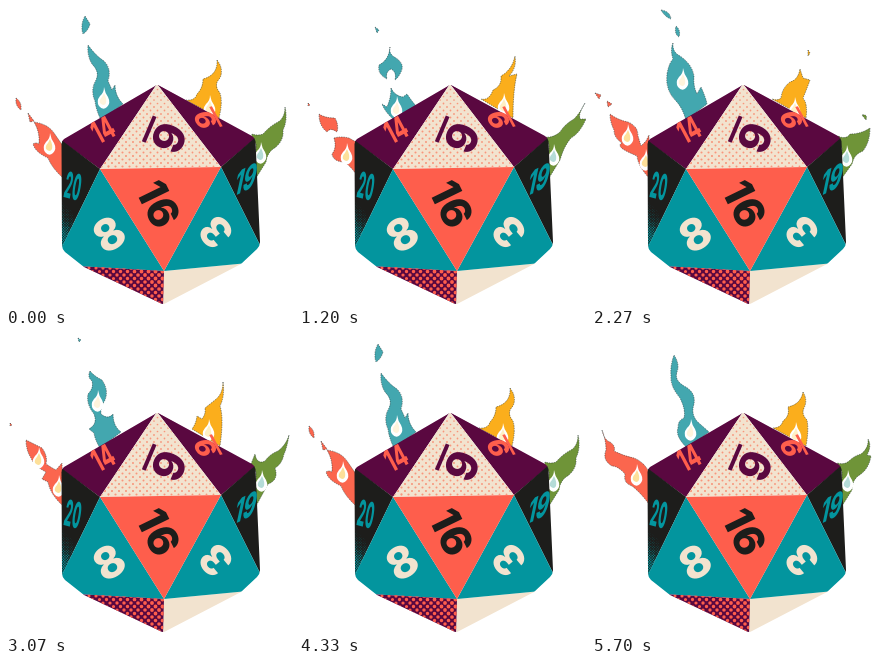
Recreate the animation shown at these times as an HTML page. Size 287 by 300 pixels, loop 5730 ms.

```html
<!DOCTYPE html>
<html lang="en">
<head>
<meta charset="utf-8">
<title>Burning d20</title>
<style>
  html, body { margin: 0; width: 100%; height: 100%; overflow: hidden; background: #fff; }
  svg { display: block; width: 287px; height: 300px; }
  .pose { visibility: hidden; }
  .pose.on { visibility: visible; }
  .pose path { stroke: #1c2b2b; stroke-width: .7; stroke-opacity: .7; stroke-dasharray: 1.4 1; }
  .t { fill: #43a7af; }
  .r { fill: #fb664e; }
  .y { fill: #fbae1c; }
  .g { fill: #6f9438; }
  .tc { color: #fff4dc; }
  .rc { color: #fde09a; }
  .yc { color: #fff0c4; }
  .gc { color: #b5dcd8; }
  .purple { fill: #5a0840; }
  .cream { fill: #f2e3cf; }
  .coral { fill: #fe5e4c; }
  .teal { fill: #03959e; }
  .ink { fill: #1d1d1b; }
  text { font-family: Inter, "Liberation Sans", sans-serif; font-weight: 800; text-anchor: middle; }
</style>
</head>
<body>
<svg viewBox="0 0 287 300">
  <defs>
    <g id="drop">
      <path fill="#fff" style="stroke:none" d="M1-11Q2-5 5-1Q8 5 4 9Q0 13-4 8Q-7 3-3-2Q1-5 1-11Z"/>
      <path fill="currentColor" style="stroke:none" d="M1-5Q4 1 3 5Q1 9-3 5Q-4 2-1-1Z"/>
    </g>
    <clipPath id="die"><path d="M149 80Q151.500 78 154 80L246 130Q249 132 249.500 135L254 236Q254 240 251 243L235 258L160 297Q157 299 154 297L78 261L59 246Q56 243 56 239L55.500 138Q55.500 135 58 133Z"/></clipPath>
    <clipPath id="top"><path d="M151 79L94 163L215 161Z"/></clipPath>
    <clipPath id="side"><path d="M55 134L94 163L56 242Z"/></clipPath>
    <clipPath id="base"><path d="M76 260L158 265L157 299Z"/></clipPath>
  </defs>

  <g id="fire">
    <g class="pose">
      <path class="t" d="M79 10L84 18Q82 25 77 28Q74 19 79 10ZM82 39Q90 50 98 55Q106 63 102 75L106 84L109 79Q109 90 117 98L95 114Q90 104 89 95Q84 84 90 74Q94 66 86 58Q81 50 82 39Z"/>
      <path class="r" d="M10 92Q16 96 15 104Q9 100 10 92ZM22 107L28 115L24 116ZM28 116Q42 118 48 127L57 140V172Q46 162 42 152Q29 146 27 138Q30 136 33 138Q34 126 28 116Z"/>
      <path class="y" d="M211 54Q218 63 214 72Q207 79 214 87Q217 96 213 112L180 94Q189 95 191 88Q197 82 197 73Q212 69 211 54Z"/>
      <path class="g" d="M279 101Q282 114 277 124Q278 134 270 141Q261 146 260 156L250 172V138Q244 134 246 128Q252 130 257 128Q264 120 272 116Q279 112 279 101Z"/>
      <use href="#drop" class="tc" x="97" y="92"/><use href="#drop" class="rc" x="43" y="138"/>
      <use href="#drop" class="yc" x="203" y="100"/><use href="#drop" class="gc" x="254" y="147"/>
    </g>
    <g class="pose">
      <path class="t" d="M69 4Q78 5 79 13Q73 11 69 4ZM84 20Q89 24 87 31Q82 28 84 20ZM81 37Q80 46 88 50Q100 58 102 70Q101 80 105 88L109 81Q114 92 115 98L94 114Q90 101 84 95Q73 84 75 68Q77 57 81 53Q78 44 81 37Z"/>
      <path class="r" d="M3 87L9 89L7 93ZM15 95L20 98L16 101ZM18 108Q26 114 36 116Q46 120 46 130L49 140L54 135L57 129V172Q46 160 45 150L36 146Q24 140 30 137Q22 132 22 124Q18 116 18 108Z"/>
      <path class="y" d="M216 44L218 47L216 50ZM208 63L211 72L218 74Q214 85 211 92Q216 98 214 112L180 93Q186 95 189 92Q190 82 198 76Q206 74 208 63Z"/>
      <path class="g" d="M270 109Q276 108 274 114ZM278 122Q278 136 271 145Q262 148 260 158L250 172V142Q244 136 246 130Q254 134 258 128Q269 128 278 122Z"/>
      <use href="#drop" class="tc" x="90" y="73"/><use href="#drop" class="rc" x="35" y="129"/>
      <use href="#drop" class="rc" x="53" y="154"/><use href="#drop" class="yc" x="202" y="102"/><use href="#drop" class="gc" x="254" y="150"/>
    </g>
    <g class="pose">
      <path class="t" d="M72 4L75 6L73 8ZM84 37Q88 42 96 46Q103 56 99 66Q94 74 95 80Q102 86 107 80Q107 92 115 98L94 114Q89 106 88 99L83 95Q92 90 88 80Q80 70 82 60Q88 54 86 47Q81 43 84 37Z"/>
      <path class="r" d="M4 89L6 91L4 92ZM20 106Q28 110 36 114Q42 122 40 130Q46 134 50 136L56 129L57 172Q44 160 42 148L36 145L40 138Q28 132 25 124Q20 116 20 106Z"/>
      <path class="y" d="M217 48Q219 62 214 72Q218 84 214 112L186 95Q190 90 191 82L196 85Q200 80 199 74Q204 70 209 66Q217 60 217 48Z"/>
      <path class="g" d="M283 101Q281 114 278 120Q276 130 269 134Q273 146 262 150L250 172V138L245 130L249 120Q251 131 259 127Q264 120 272 117Q280 111 283 101Z"/>
      <use href="#drop" class="tc" x="91" y="67"/><use href="#drop" class="rc" x="32" y="124"/>
      <use href="#drop" class="rc" x="52" y="152"/><use href="#drop" class="yc" x="202" y="96"/><use href="#drop" class="gc" x="255" y="147"/>
    </g>
    <g class="pose">
      <path class="t" d="M88 31Q89 41 96 47Q105 56 100 68Q95 77 103 85L107 81Q110 92 116 99L94 114Q85 104 84 95Q84 87 89 79Q80 71 81 61Q85 54 88 48Q86 40 88 31Z"/>
      <path class="r" d="M16 99Q24 108 34 111Q42 118 39 127L50 134L56 130L57 171Q46 160 42 150L34 146L38 138Q34 130 28 124Q17 116 16 99Z"/>
      <path class="y" d="M213 50Q218 63 213 74Q217 88 214 112L183 94Q190 91 192 82Q198 78 199 70Q213 64 213 50Z"/>
      <path class="g" d="M280 102Q281 114 277 122Q275 133 268 138Q269 147 261 152L250 172V138L246 128Q253 131 260 126Q276 117 280 102Z"/>
      <use href="#drop" class="tc" x="91" y="65"/><use href="#drop" class="rc" x="50" y="150"/>
      <use href="#drop" class="yc" x="203" y="99"/><use href="#drop" class="gc" x="255" y="148"/>
    </g>
    <g class="pose">
      <path class="t" d="M83 25Q83 35 91 41Q101 49 103 58Q105 67 98 76Q98 84 106 88L116 99L94 114Q84 105 85 97Q88 89 89 79Q80 72 81 61Q91 53 86 44Q80 36 83 25Z"/>
      <path class="r" d="M12 95Q18 106 30 110Q40 115 38 125L50 132L57 136V170Q47 160 42 152Q33 151 33 144Q37 140 35 132Q28 126 23 122Q13 114 12 95Z"/>
      <path class="y" d="M211 57Q217 66 212 76Q217 90 214 112L182 94Q190 93 193 84Q199 80 201 73Q211 68 211 57Z"/>
      <path class="g" d="M277 106Q280 117 276 125Q274 134 267 140Q267 148 260 153L250 172V138L246 129Q254 131 260 127Q275 120 277 106Z"/>
      <use href="#drop" class="tc" x="92" y="64"/><use href="#drop" class="rc" x="49" y="149"/>
      <use href="#drop" class="yc" x="203" y="99"/><use href="#drop" class="gc" x="255" y="148"/>
    </g>
    <g class="pose">
      <path class="t" d="M79 20L82 26L79 31Q75 26 79 20ZM89 41Q90 49 98 53Q106 60 101 68Q96 77 95 85Q100 91 108 88L116 99L94 114Q84 105 84 97Q90 91 90 80Q79 70 80 60Q90 54 89 41Z"/>
      <path class="r" d="M11 96L14 101L11 102ZM19 105Q26 111 36 112Q40 119 38 127L49 132L57 136V169Q48 160 43 154Q33 153 33 146Q38 141 34 132Q19 122 19 105Z"/>
      <path class="y" d="M214 54Q217 64 211 73L217 71Q214 88 214 112L182 94Q190 94 194 84Q202 80 202 71Q212 66 214 54Z"/>
      <path class="g" d="M282 101Q278 112 280 118Q278 129 269 136Q266 147 260 154L250 172V139L246 130Q254 131 261 126Q275 118 282 101Z"/>
      <use href="#drop" class="tc" x="91" y="63"/><use href="#drop" class="rc" x="48" y="149"/>
      <use href="#drop" class="yc" x="204" y="99"/><use href="#drop" class="gc" x="255" y="149"/>
    </g>
    <g class="pose">
      <path class="t" d="M76 21L80 24L78 27ZM91 41Q89 48 97 52Q106 58 102 66Q99 72 96 74Q98 66 92 63Q86 66 88 73Q78 68 80 59Q90 54 91 41ZM92 82Q96 90 104 91L108 88Q112 94 117 100L95 114Q86 106 83 98L88 101Q92 92 92 82Z"/>
      <path class="r" d="M9 97L11 99L9 100ZM20 108Q26 112 36 112Q40 119 38 126Q31 121 28 126Q20 120 20 108ZM35 132Q42 130 50 132L57 136V168Q50 158 44 156Q34 155 33 148Q38 142 35 132Z"/>
      <path class="y" d="M216 50Q218 62 210 70L218 68Q214 84 214 112L182 93Q190 95 194 84Q203 80 202 70Q213 64 216 50Z"/>
      <path class="g" d="M286 97Q279 108 281 113L287 113Q281 127 272 132Q265 140 261 154L250 172V139L247 131Q254 132 261 126Q266 118 275 113Q281 107 286 97Z"/>
      <use href="#drop" class="tc" x="97" y="101"/><use href="#drop" class="rc" x="47" y="148"/>
      <use href="#drop" class="yc" x="204" y="98"/><use href="#drop" class="gc" x="254" y="149"/>
    </g>
    <g class="pose">
      <path class="t" d="M91 29Q87 40 94 46L97 41Q98 50 102 57Q105 68 100 77Q108 82 108 90L117 98L95 114Q84 104 83 96Q82 84 89 86Q93 82 84 74Q79 65 84 57Q90 54 87 48Q80 40 91 29Z"/>
      <path class="r" d="M16 99Q28 102 28 112Q26 118 36 124Q44 126 50 130L57 136V168Q50 158 42 153Q33 150 34 146Q40 140 32 130Q18 124 17 116L22 116Q22 108 16 99Z"/>
      <path class="y" d="M215 50Q219 60 212 69L217 70Q212 82 215 90L214 112L184 95Q189 93 190 84L195 86Q197 78 194 70Q205 68 209 62Q215 57 215 50Z"/>
      <path class="g" d="M284 97Q278 107 281 112L286 114Q281 126 273 130Q264 138 263 150L250 172V138L246 128Q253 131 258 126L256 121Q264 120 271 116Q280 109 284 97Z"/>
      <use href="#drop" class="tc" x="98" y="97"/><use href="#drop" class="rc" x="46" y="144"/>
      <use href="#drop" class="yc" x="203" y="98"/><use href="#drop" class="gc" x="255" y="147"/>
    </g>
    <g class="pose">
      <path class="t" d="M82 21Q88 30 85 38Q82 46 92 52Q104 58 102 70Q98 82 108 90L117 98L95 114Q83 102 86 94Q86 86 92 84Q94 76 88 64Q78 52 79 42Q78 32 82 21Z"/>
      <path class="r" d="M10 96Q12 106 18 108Q24 112 22 117Q32 122 42 124Q52 128 57 138V170Q48 158 40 152Q31 149 33 140Q26 132 20 132Q10 126 14 116Q14 106 10 96Z"/>
      <path class="y" d="M211 58Q216 66 212 74Q209 80 215 86Q217 96 214 112L181 94Q189 94 191 87Q198 82 196 73Q209 70 211 58Z"/>
      <path class="g" d="M276 105Q280 112 275 121L279 122Q277 134 269 140Q260 145 260 156L250 172V138L245 129Q253 131 257 127Q262 122 269 120Q277 114 276 105Z"/>
      <use href="#drop" class="tc" x="98" y="96"/><use href="#drop" class="rc" x="44" y="141"/>
      <use href="#drop" class="yc" x="203" y="99"/><use href="#drop" class="gc" x="255" y="147"/>
    </g>
  </g>

  <g clip-path="url(#die)">
    <path class="purple" d="M151 78L54 134L94 163ZM151 78L251 131L215 161Z"/>
    <path class="ink" d="M54 133L94 163L55 243ZM251 130L215 161L255 241Z"/>
    <path class="cream" d="M151 78L94 163L215 161ZM158 265L240 257L157 300Z"/>
    <path class="teal" d="M94 163L55 243L70 260L158 265ZM215 161L158 265L242 257L255 241Z"/>
    <path class="coral" d="M94 163L215 161L158 265Z"/>
    <path class="purple" d="M70 260L158 265L157 300Z"/>
    <path id="topDots" fill="#f8967c" clip-path="url(#top)"/>
    <path id="sideDots" class="teal" clip-path="url(#side)"/>
    <path id="baseDots" class="coral" clip-path="url(#base)"/>
  </g>

  <g class="purple" transform="translate(157 129) rotate(113)">
    <text y="9" font-size="43">6</text><path d="M-14 13H14V17H-14Z"/>
  </g>
  <g class="coral" transform="translate(198 114) rotate(-118) skewX(-12) scale(.95 .9)">
    <text y="9" font-size="29" transform="rotate(180)">6</text><path d="M-12 12H12V15H-12Z"/>
  </g>
  <text class="coral" font-size="31" transform="translate(97 124) rotate(-28) scale(.62 1)" y="11">14</text>
  <text class="ink" font-size="42" transform="translate(152.500 198) rotate(64)" y="15">16</text>
  <text class="teal" font-size="36" transform="translate(67 180) rotate(10) skewY(5) scale(.34 1)" y="13">20</text>
  <text class="teal" font-size="36" transform="translate(240 173) rotate(12) skewY(-38) scale(.48 1)" y="13">19</text>
  <text class="cream" font-size="44" transform="translate(103 228) rotate(-32)" y="16">8</text>
  <text class="cream" font-size="42" transform="translate(210 226) rotate(-130)" y="15">3</text>
</svg>
<script>
  const LOOP = 5730, TICKS_PER_MS = 0.03, TICKS_PER_POSE = 2.4;

  // Staggered dot screen; size(x, y) gives each radius.
  function halftone(id, [x0, y0, x1, y1], step, size) {
    let d = '';
    for (let row = 0, y = y0; y < y1; y += step / 2, row++) {
      for (let x = x0 + (row % 2) * step / 2; x < x1; x += step) {
        const r = size(x, y);
        if (r > 0.1) d += `M${x - r} ${y}a${r} ${r} 0 1 0 ${2 * r} 0a${r} ${r} 0 1 0 ${-2 * r} 0`;
      }
    }
    document.getElementById(id).setAttribute('d', d);
  }
  halftone('topDots', [92, 80, 216, 164], 7, (x, y) => 0.95 + (y - 80) / 400 - (x - 92) / 500);
  halftone('sideDots', [55, 185, 80, 243], 2.6, (x, y) => Math.min(0.8, (y - 190) / 45 - (x - 56) / 45));
  halftone('baseDots', [55, 241, 160, 300], 7, (x, y) => 1.5 + (x - 56) / 130 - (y - 242) / 110);

  const poses = document.querySelectorAll('.pose');
  let current = -1;
  function draw(now) {
    const tick = Math.floor((now % LOOP + 4) * TICKS_PER_MS);
    const next = Math.floor(tick / TICKS_PER_POSE + 1e-6) % poses.length;
    if (next !== current) {
      poses.forEach((pose, i) => pose.classList.toggle('on', i === next));
      current = next;
    }
  }
  const start = performance.now();
  function loop() {
    draw(performance.now() - start);
    requestAnimationFrame(loop);
  }
  loop();
</script>
</body>
</html>
```
